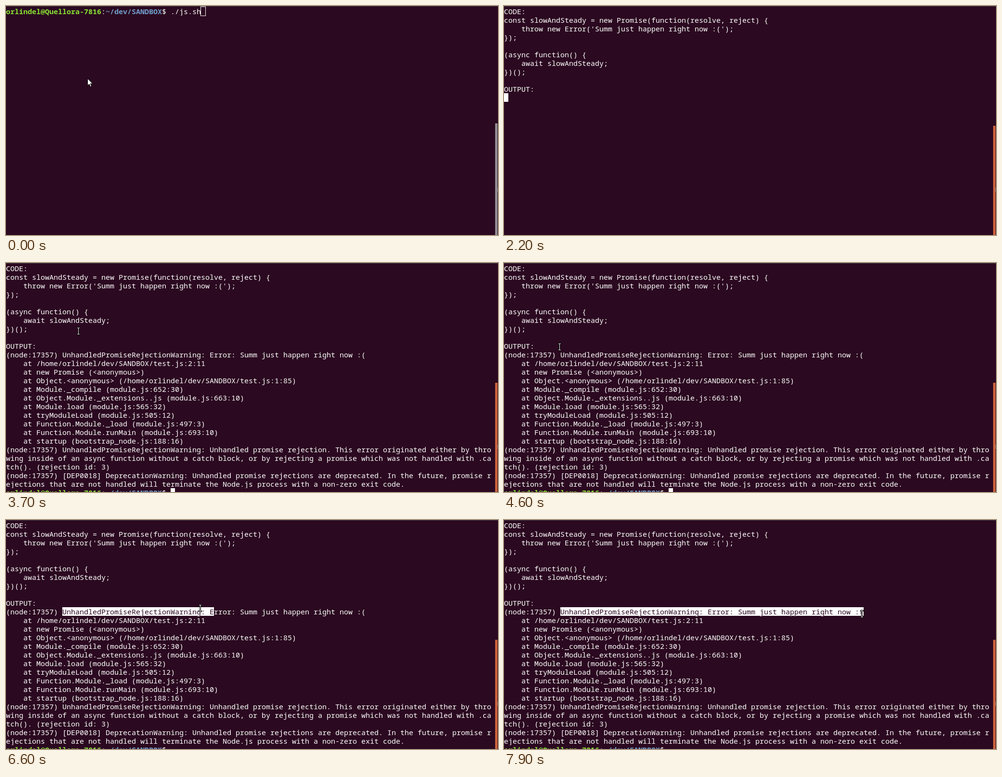
An HTML page that plays this animation: 1022 by 478 pixels, repeating every 8000 ms.

```html
<!DOCTYPE html>
<html lang="en">
<head>
<meta charset="utf-8">
<title>Terminal</title>
<style>
  html, body { margin: 0; width: 100%; height: 100%; overflow: hidden; background: #2b0920; }
  #stage { position: relative; width: 1022px; height: 478px; overflow: hidden; background: #2b0920; color: #fff; }
  #stage > * { position: absolute; }
  pre { margin: 0; left: 0; width: 1022px; overflow: hidden; font: 15px/18px "Noto Sans Mono", monospace; }
  pre b { color: #8ae234; }
  pre b + b { color: #729fcf; }
  #edge { left: 0; top: 0; width: 1022px; height: 1px; background: #454042; }
  #out { top: 2px; }
  #sel { top: 182px; height: 18px; background: #fff; color: #2b0920; }
  #caret { box-sizing: border-box; }
  #bar { left: 1016px; width: 5px; height: 240px; }
  #grip { left: 1020px; top: 380px; width: 2px; height: 8px;
    background: repeating-linear-gradient(#aaa5a7 0 1px, transparent 1px 3px); }
  svg { left: 0; top: 0; overflow: visible; }
</style>
</head>
<body>
<div id="stage">
  <div id="edge"></div>
  <pre id="out">
CODE:
const slowAndSteady = new Promise(function(resolve, reject) {
    throw new Error('Summ just happen right now :(');
});

(async function() {
    await slowAndSteady;
})();

OUTPUT:
(node:17357) UnhandledPromiseRejectionWarning: Error: Summ just happen right now :(
    at /home/orlindel/dev/SANDBOX/test.js:2:11
    at new Promise (&lt;anonymous&gt;)
    at Object.&lt;anonymous&gt; (/home/orlindel/dev/SANDBOX/test.js:1:85)
    at Module._compile (module.js:652:30)
    at Object.Module._extensions..js (module.js:663:10)
    at Module.load (module.js:565:32)
    at tryModuleLoad (module.js:505:12)
    at Function.Module._load (module.js:497:3)
    at Function.Module.runMain (module.js:693:10)
    at startup (bootstrap_node.js:188:16)
(node:17357) UnhandledPromiseRejectionWarning: Unhandled promise rejection. This error originated either by thro
wing inside of an async function without a catch block, or by rejecting a promise which was not handled with .ca
tch(). (rejection id: 3)
(node:17357) [DEP0018] DeprecationWarning: Unhandled promise rejections are deprecated. In the future, promise r
ejections that are not handled will terminate the Node.js process with a non-zero exit code.</pre>
  <pre id="prompt"><b>orlindel@Quellora-7816</b>:<b>~/dev/SANDBOX</b>$ <span id="cmd">./js.sh</span></pre>
  <pre id="sel"></pre>
  <div id="caret"></div>
  <div id="bar"></div>
  <div id="grip"></div>
  <svg id="arrow" width="14" height="20">
    <path d="M0 0V14.5L3.4 11.5L5.8 17L8.2 16L5.8 10.6H10.4Z" fill="#fff" stroke="#000"/>
  </svg>
  <svg id="beam" width="8" height="16" fill="none" stroke-linecap="square">
    <path d="M-1.5 -6.5H2.5M-1.5 6.5H2.5M.5 -6V6" stroke="#000" stroke-width="3"/>
    <path d="M-1.5 -6.5H2.5M-1.5 6.5H2.5M.5 -6V6" stroke="#fff"/>
  </svg>
</div>
<script>
const LOOP = 8000, TICK = 100, BLINK = 600;
const HOVER = 200, FOCUS = 1000, ENTER = 2200, DONE = 2300, WAKE = 3700, PRESS = 5800;
const CELL = 9, ROW = 18, TOP = 2, ERROR_ROW = 10, ANCHOR = 13, LEAD = 80;
const $ = id => document.getElementById(id);
const [out, prompt, cmd, sel, caret, bar, arrow, beam] =
  ['out', 'prompt', 'cmd', 'sel', 'caret', 'bar', 'arrow', 'beam'].map($);

const lines = out.textContent.trimEnd().split('\n');
const errorLine = lines[ERROR_ROW];
sel.textContent = errorLine;

// turning points of the pointer: time, x, y
const route = [
  [WAKE, 150, 142], [3900, 95, 126], [4600, 115, 175], [4900, 115, 187],
  [5700, 118, 190], [6000, 233, 177], [6300, 285, 175], [7200, 638, 201],
  [7400, 642, 198], [7900, 743, 196]
];

function pointer(t) {
  if (t < ENTER) return [171, 153];
  const i = Math.max(1, route.findIndex(p => p[0] > t));
  if (t >= route.at(-1)[0]) return route.at(-1).slice(1);
  const [t0, x0, y0] = route[i - 1], [t1, x1, y1] = route[i];
  const k = Math.max(0, (t - t0) / (t1 - t0));
  return [x0 + (x1 - x0) * k, y0 + (y1 - y0) * k].map(Math.round);
}

// The drag runs a little ahead of the drawn pointer; above the line it selects back to its start.
function selectionEnd(t) {
  if (t < PRESS) return ANCHOR;
  const [x, y] = pointer(t + LEAD);
  return y < TOP + ERROR_ROW * ROW ? 0 : Math.min(errorLine.length, Math.round(x / CELL));
}

const show = (el, on) => { el.style.visibility = on ? 'visible' : 'hidden'; };
const move = (el, x, y) => { el.style.transform = `translate(${x}px, ${y}px)`; };

function drawCaret(t) {
  const hollow = t < FOCUS, pad = hollow ? 1 : 0;
  const [col, row] = t < ENTER ? [45, 0] : t < DONE ? [0, ERROR_ROW] : [38, lines.length];
  caret.style.width = CELL + 2 * pad + 'px';
  caret.style.height = ROW + 2 * pad + 'px';
  caret.style.border = hollow ? '1px solid #fff' : 'none';
  caret.style.background = hollow ? 'none' : '#fff';
  move(caret, col * CELL - pad, TOP + row * ROW - pad);
  show(caret, hollow || Math.floor((t - FOCUS) / BLINK) % 2 === 0);
}

function drawPointer(t) {
  show(arrow, t < HOVER);
  move(arrow, 169.5, 151.5);
  show(beam, t >= HOVER && t < ENTER || t >= WAKE);
  move(beam, ...pointer(t));
}

function drawSelection(t) {
  const end = selectionEnd(t);
  const from = Math.min(ANCHOR, end) * CELL, to = Math.max(ANCHOR, end) * CELL;
  show(sel, to > from);
  sel.style.clipPath = `inset(0 ${1022 - to}px 0 ${from}px)`;
}

function draw(t) {
  const typing = t < ENTER;
  show(out, !typing);
  out.style.height = (t < DONE ? ERROR_ROW : lines.length) * ROW + 'px';
  show(prompt, typing || t >= DONE);
  prompt.style.top = TOP + (typing ? 0 : lines.length * ROW) + 'px';
  cmd.style.display = typing ? 'inline' : 'none';
  bar.style.top = (typing ? 245 : 250) + 'px';
  bar.style.background = t < FOCUS ? '#918d90' : t < FOCUS + TICK ? '#ae7866' : '#cb623c';
  drawCaret(t);
  drawPointer(t);
  drawSelection(t);
}

function loop() {
  draw(Math.floor(performance.now() % LOOP / TICK) * TICK);
  requestAnimationFrame(loop);
}
loop();
</script>
</body>
</html>
```
